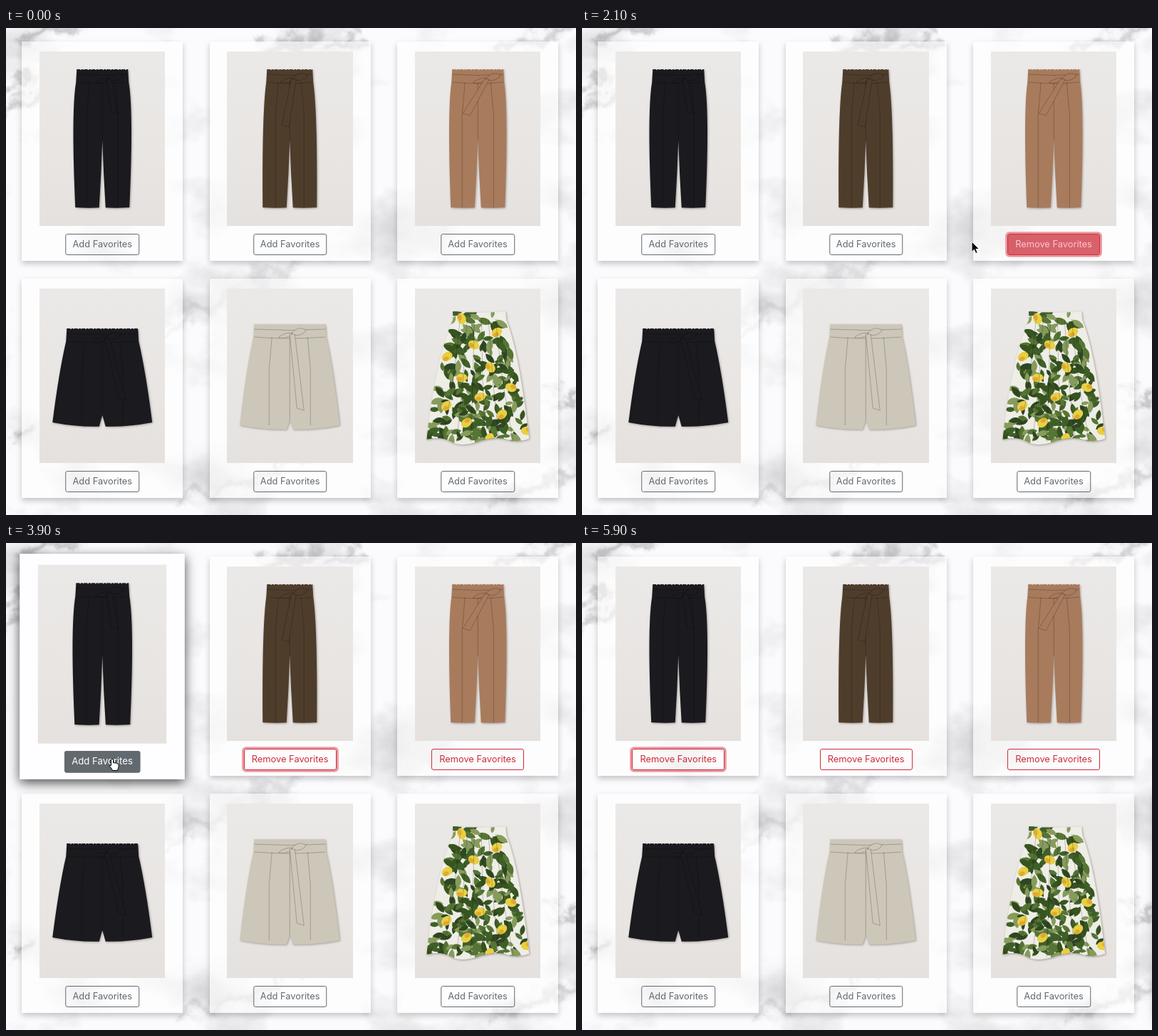
These frames come from a looping animation (800 by 684 pixels, 6 s). An HTML page:

```html
<!DOCTYPE html>
<html lang="en">
<head>
<meta charset="utf-8">
<title>Favorites</title>
<style>
html, body { margin: 0; width: 100%; height: 100%; overflow: hidden; background: #fbfafc; }
#stage { position: relative; width: 800px; height: 684px; overflow: hidden; }
#marble { position: absolute; inset: 0; will-change: transform; }
.card {
  position: absolute; width: 226px; height: 308.6px;
  background: rgba(255, 255, 255, .6); box-shadow: 0 4px 8px rgba(0, 0, 0, .22);
}
.card.hover {
  transform: scale(1.025); z-index: 1;
  background: #fefdff; box-shadow: 0 5px 15px rgba(0, 0, 0, .68);
}
.photo { position: absolute; left: 24.7px; top: 14.7px; background: linear-gradient(#ebe9e7, #e8e5e3 60%, #e5e1de); }
.photo > g { filter: drop-shadow(1px 1px 1.5px rgba(60, 50, 45, .4)); }
.btn {
  --c: #62696f; --ring: rgba(108, 117, 125, .5);
  position: absolute; left: 50%; top: 270.1px; width: 103.5px; height: 30.4px;
  transform: translateX(-50%); box-sizing: border-box;
  border: 1px solid var(--c); border-radius: 3px;
  font: 12.85px/28.6px Inter, "Open Sans", sans-serif; text-align: center; white-space: nowrap;
  background: color-mix(in srgb, var(--c) var(--fill), transparent);
  color: color-mix(in srgb, white var(--fill), var(--c));
}
.btn.fav { --c: #cc2c3a; --ring: rgba(220, 53, 69, .5); width: 130px; }
.btn.focus { box-shadow: 0 0 0 2.8px var(--ring); }
#cursor { position: absolute; left: 0; top: 0; z-index: 2; overflow: visible; }
</style>
</head>
<body>
<div id="stage">
  <svg id="marble" width="800" height="684" color-interpolation-filters="sRGB">
    <filter id="rough" filterUnits="userSpaceOnUse" x="-40" y="-40" width="880" height="764">
      <feTurbulence type="fractalNoise" baseFrequency=".025" numOctaves="5" seed="8" result="noise"/>
      <feGaussianBlur in="SourceGraphic" stdDeviation="5"/>
      <feDisplacementMap in2="noise" scale="70" xChannelSelector="R" yChannelSelector="G"/>
    </filter>
    <filter id="fog" x="0" y="0" width="1" height="1">
      <feTurbulence type="fractalNoise" baseFrequency=".008 .012" numOctaves="5" seed="4"/>
      <feColorMatrix values="0 0 0 0 .66  0 0 0 0 .66  0 0 0 0 .68  1.6 0 0 0 -.82"/>
    </filter>
    <rect width="800" height="684" fill="#fbfafc"/>
    <rect width="800" height="684" filter="url(#fog)" opacity=".7"/>
    <g id="veins" stroke="#77777c" stroke-linecap="round" filter="url(#rough)"/>
  </svg>
  <svg id="cursor" width="16" height="20"><path stroke-linejoin="round"/></svg>
</div>
<script>
const $ = id => document.getElementById(id);
const stage = $('stage'), cursor = $('cursor');

let seed = 11;
const rnd = () => (seed = seed * 16807 % 2147483647) / 2147483647;

// Veins rise to the right; short ones are darker. Each: centre x, y, length
const veins = [
  [30, 100, 80], [25, 76, 20], [55, 12, 60], [400, 12, 70], [468, 15, 40], [745, 14, 110],
  [310, 378, 200], [788, 517, 30], [20, 572, 35], [345, 630, 180], [745, 645, 130]
];
$('veins').innerHTML = veins.map(([x, y, len]) => {
  const dx = len * .47, dy = len * .2;
  return `<path d="M${x - dx} ${y + dy}L${x + dx} ${y - dy}" stroke-width="11" opacity="${.55 - len / 600}"/>`;
}).join('');

const fill = (d, color) => `<path d="${d}" fill="${color}"/>`;
const crease = d => `<path d="${d}" fill="none" stroke="#000" opacity=".22"/>`;

// Garments are centred on x = 0, with y measured from the photo's top edge.
// waist, hip and hem are half widths; the tail of the bow leans sideways by lean
function bottoms({ color, waist, hip, hem, top, crotch, end, knot, lean, tail }) {
  const belt = top + 17, sag = (hem - 36) / 6, inner = end + sag;
  const body = `M${-waist} ${top}H${waist}L${waist + 1} ${belt}Q${hip} ${top + 60} ${hem} ${end}
    Q${hem / 2} ${inner + 1} 4.5 ${inner}Q1.5 ${(crotch + end) / 2} 0 ${crotch}
    Q-1.5 ${(crotch + end) / 2} -4.5 ${inner}Q${-hem / 2} ${inner + 1} ${-hem} ${end}
    Q${-hip} ${top + 60} ${-waist - 1} ${belt}Z`;
  const pleat = waist / 2;
  const bow = ['M0 0Q9 -10 20 -4Q15 6 0 3Z', 'M0 0Q-12 0 -19 7Q-9 9 0 3Z', `M-3 2L${lean - 5} ${tail}L${lean + 5} ${tail + 3}L4 2Z`];
  return `<path d="M${-waist} ${top}H${waist}" stroke="${color}" stroke-width="2" stroke-dasharray="5 1.5 3 1"/>` +
    fill(body, color) +
    crease(`M${-waist} ${top + 6}Q0 ${top + 9} ${waist} ${top + 6}M${-waist} ${belt}Q0 ${belt + 4} ${waist} ${belt}
      M0 ${belt}V${crotch}M${-pleat} ${belt}L${-pleat - 4} ${belt + 45}V${end}M${pleat} ${belt}L${pleat + 4} ${belt + 45}V${end}`) +
    `<g transform="translate(${knot} ${top + 11})">` + bow.map(d => fill(d, color) + crease(d)).join('') + '</g>';
}

function skirt() {
  const body = 'M-35 32Q0 35 39 32L40 44C54 80 64 140 72 211Q56 217 40 212T0 215T-38 215T-72 212C-64 140 -50 75 -35 44Z';
  const greens = ['#2f4720', '#3f5f28', '#567534', '#869b5c', '#37541f'];
  // Even spread over the widening cloth, for u and v in 0..1
  const place = (u, v) => {
    const k = 2 * Math.sqrt(.25 + .75 * u) - 1;
    return `translate(${(v * 2 - 1) * (36 + 36 * k)} ${32 + 184 * k}) rotate(${rnd() * 360})`;
  };
  let print = '', folds = '';
  for (let i = 0; i < 240; i++)
    print += `<path d="M-8 0Q0 -8 9 0Q0 7 -8 0" fill="${greens[i % 5]}" transform="${place(rnd(), rnd())} scale(${.7 + rnd() * .6})"/>`;
  for (let i = 0; i < 13; i++)
    print += `<g transform="${place((i + .5) / 13, (i * .618 + .2) % 1)}"><ellipse rx="6" ry="8" fill="#e9cf42"/><ellipse cx="2" cy="3" rx="3" ry="4" fill="#dfaa30"/></g>`;
  for (let x = -25; x <= 25; x += 10) folds += `M${x} 43Q${x * 1.3} 130 ${x * 2} 215`;
  return `<clipPath id="cut"><path d="${body}"/></clipPath>${fill(body, '#eeede6')}<g clip-path="url(#cut)">${print}${crease(folds)}</g>`;
}

const trousers = { waist: 36, hip: 44, hem: 38, top: 26, crotch: 125, end: 219 };
const shorts = { waist: 50, hip: 61, hem: 70, top: 57, crotch: 178, end: 188 };
const garments = [
  bottoms({ ...trousers, color: '#1b1a1f', knot: 9, lean: 8, tail: 48 }),
  bottoms({ ...trousers, color: '#4f3d2c', waist: 32, hip: 39, knot: 5, lean: -11, tail: 66 }),
  bottoms({ ...trousers, color: '#a87b5d', hip: 43, knot: 12, lean: -28, tail: 50 }),
  bottoms({ ...shorts, color: '#1b1a1f', knot: 6, lean: 22, tail: 86 }),
  bottoms({ ...shorts, color: '#cdc7b9', top: 51, crotch: 185, end: 192, knot: 3, lean: 12, tail: 106 }),
  skirt()
];

const HALF_W = 113, HALF_H = 154.3;
const cards = [...Array(8).keys()].map(i => {
  const col = i % 4, row = i >> 2, cx = 135.3 + 263.35 * col, cy = 172.8 + 333 * row;
  const el = document.createElement('div');
  el.style.left = cx - HALF_W + 'px';
  el.style.top = cy - HALF_H + 'px';
  const art = col < 3 ? garments[row * 3 + col] : '';
  el.innerHTML = `<svg class="photo" width="176.5" height="245" viewBox="-88.25 0 176.5 245"><g>${art}</g></svg><div></div>`;
  stage.append(el);
  return { el, btn: el.lastChild, cx, cy };
});

// Pointer moves: start, end, then the place reached
const moves = [
  [200, 700, 750, 297], [900, 1200, 678, 298], [1800, 2400, 416, 302],
  [2900, 3600, 149, 303], [4570, 4700, 338, 318], [4700, 5100, 830, 470]
];
const presses = [[1400, 2], [2600, 1], [4000, 0]]; // time, card

function pointer(t) {
  let x = 815, y = 330;
  for (const [start, end, toX, toY] of moves) {
    const k = Math.min(1, Math.max(0, (t - start) / (end - start))), s = k * k * (3 - 2 * k);
    x += (toX - x) * s;
    y += (toY - y) * s;
  }
  return [x, y];
}

const isFavorite = (i, t) => presses.some(([at, card]) => card === i && t >= at + 100);

function overButton(i, t) {
  const [x, y] = pointer(t), { cx, cy } = cards[i];
  return Math.abs(x - cx) < (isFavorite(i, t) ? 60 : 47) && Math.abs(y - cy - 132) < 15;
}

const ARROW = 'M0 0V14.5L3.4 11.4L5.8 16.6L8.2 15.5L5.9 10.5H10.4Z';
const HAND = 'M3 10V2.2Q4.5 .2 6 2.2V7Q7.5 5.6 8.6 7.2Q10.2 6.2 11.2 8Q13.4 7.4 13.6 9.6V12Q13 14.5 12 17.5H5.2Q3 13.5 .8 11.4Q.3 9.2 3 10.5Z';

function render(t) {
  const [x, y] = pointer(t), focused = presses.findLast(p => t >= p[0])?.[1];
  let hand = false;
  cards.forEach(({ el, btn, cx, cy }, i) => {
    // Cards that lie off the stage react only once the pointer has left it
    const hover = t > 200 && Math.abs(x - cx) < HALF_W && Math.abs(y - cy) < HALF_H;
    const now = overButton(i, t), before = overButton(i, t - 100), fav = isFavorite(i, t);
    hand ||= now;
    el.className = hover ? 'card hover' : 'card';
    btn.className = 'btn' + (fav ? ' fav' : '') + (focused === i ? ' focus' : '');
    btn.textContent = fav ? 'Remove Favorites' : 'Add Favorites';
    btn.style.setProperty('--fill', now * 25 + before * 75 + '%');
  });
  const path = cursor.firstElementChild;
  path.setAttribute('d', hand ? HAND : ARROW);
  path.setAttribute('fill', hand ? '#fff' : '#000');
  path.setAttribute('stroke', hand ? '#000' : '#fff');
  cursor.style.transform = `translate(${x - hand * 4.5}px, ${y - hand}px)`;
}

// The picture advances in steps of 100 ms
let shown = -1;
function tick() {
  const t = Math.floor(performance.now() % 6000 / 100) * 100;
  if (t !== shown) render(shown = t);
  requestAnimationFrame(tick);
}
tick();
</script>
</body>
</html>
```
